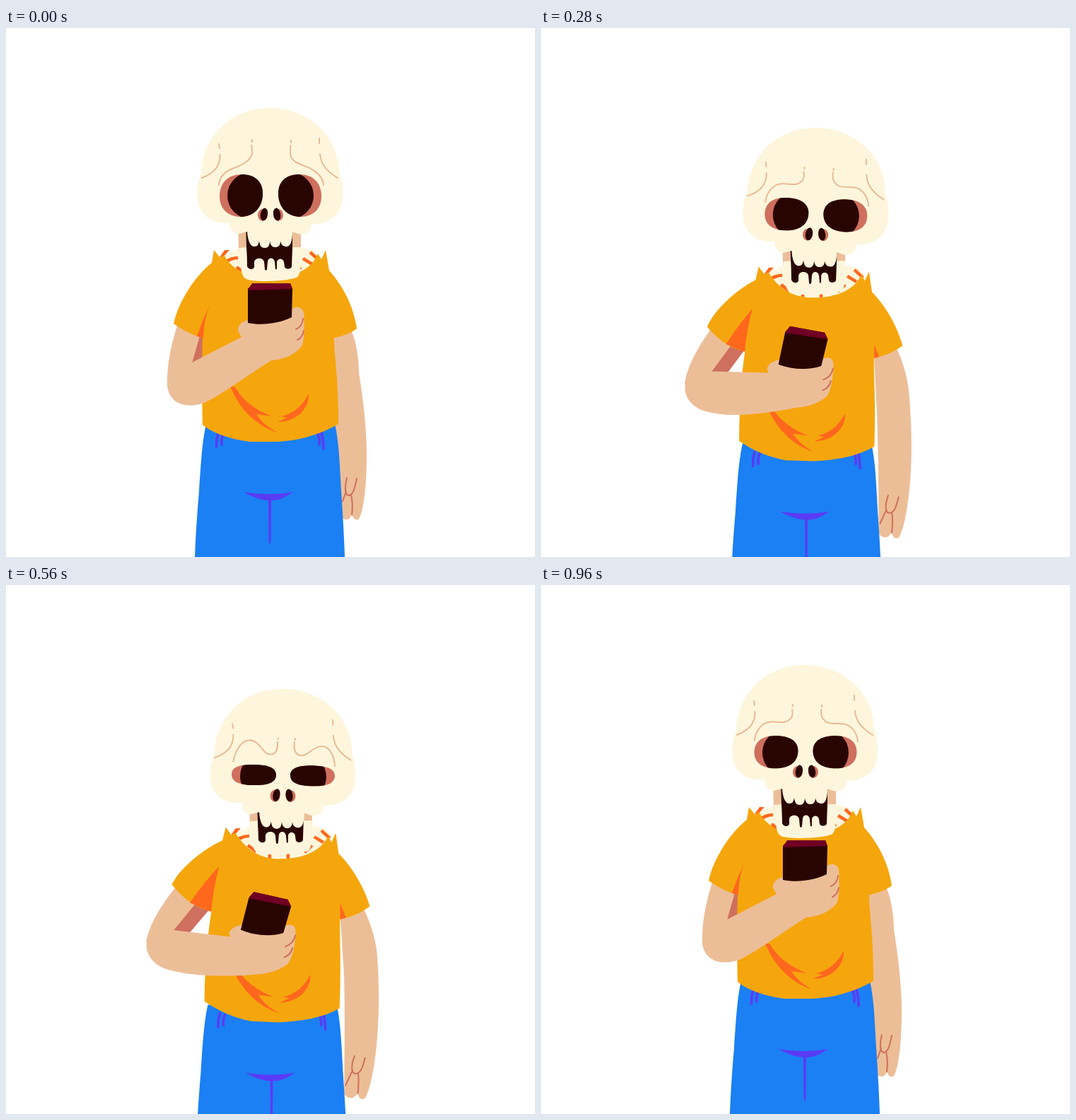
An HTML page that plays this animation: 748 px wide and 748 px high, repeating every 1000 ms.

```html
<!DOCTYPE html>
<html lang="en">
<head>
<meta charset="utf-8">
<title>Skeleton with phone</title>
<style>
html, body { margin: 0; width: 100%; height: 100%; overflow: hidden; background: #fff; }
svg { display: block; width: 100vw; height: 100vh; }
.skin { fill: #ecbe98; } .shirt { fill: #f5a60d; } .fold { fill: #ff671d; }
.bone { fill: #fdf6dc; } .dark { fill: #290502; } .shade { fill: #cf6f5e; }
.jeans { fill: #1b80f3; } .seam { fill: #5a3bf5; } .glass { fill: #700024; }
.line { fill: none; stroke-width: 2; stroke-linecap: round; stroke-linejoin: round; }
.brow { stroke: #e9ba93; } .crease { stroke: #cf6f5e; }
.pocket { stroke: #5a3bf5; stroke-width: 3.6; }
.rib { stroke: #ff671d; stroke-width: 4.5; stroke-linecap: butt; }
</style>
</head>
<body>
<svg viewBox="0 0 748 748">
  <defs><clipPath id="lid"><path id="lidShape"/></clipPath></defs>
  <path id="arm" class="skin"/>
  <path id="fingers" class="line crease"/>
  <g id="legs">
    <path class="jeans" d="M283,560 C277,585 275,625 273,655 C270,690 268,720 267,748 L264,800 H482 L479,748 C478,715 476,685 474,655 C472,620 471,585 465,560Z"/>
    <path class="line pocket" d="M300,572 Q297,582 297.500,592 M307,574 Q304,582 305,589 M441,574 Q444,582 443,589 M446,572 Q449,582 449,595"/>
    <path class="seam" d="M336,656 C358,660 385,660 406,656 C394,664 386,668 375,668 L374.500,724 Q373,736 371.500,724 L371,668 C358,667 348,663 336,656Z"/>
  </g>
  <path id="upper" class="skin"/>
  <path id="inner" class="shade"/>
  <g id="neck">
    <path class="bone" d="M306,323 L318,317 L330,311 H420 L434,314 L444,324 L434,344 L400,360 L372,362 L340,358 L314,338Z"/>
    <path class="fold" d="M302,324 L309,314 L316,314 L307,324Z"/>
    <path class="line rib" d="M310,331 Q319,325 328,325 M326,338 L338,347 M357,350 V360 M383,350 V360 M406,348 L417,338 M420,326 L433,334 M430,317 L442,328"/>
  </g>
  <path id="shirt" class="shirt"/>
  <path id="armpit" class="fold"/>
  <path id="armpitR" class="fold"/>
  <path id="folds" class="fold" d="M317,506 L324,508 C335,528 355,541 376,549 L354,546 C362,558 372,566 384,572 C355,563 330,540 317,506Z M428,517 C429,537 412,557 384,557 L398,551 L389,549 C408,545 420,533 428,517Z"/>
  <g id="jaw">
    <path class="skin" d="M328,275 H341 V316 H329Z M404,275 H417 V316 H404Z"/>
    <path class="dark" d="M339,275 H405 V345 H341Z"/>
    <path class="bone" d="M329,311 L340,310 L341,337 C343,342 350,342 351,338 L351,331 C352,324 364,324 365,331 L366,341 C366,343 369,343 369,341 L370,330 C371,324 379,324 380,331 L381,341 C382,342 383,341 383,339 L383,331 C384,325 392,325 393,331 L394,338 C396,342 404,341 404,337 L405,310 L417,310 C416,330 419,345 412,352 C400,359 345,360 338,354 C331,348 333,335 329,311Z"/>
  </g>
  <g id="head">
    <path class="bone" d="M276,205 C279,150 320,113 373,113 C425,113 470,150 471,203 C477,220 478,240 473,254 C466,270 452,277 432,277 C433,288 422,293 413,291 L405,288 C405,302 402,309 397,309 C392,309 389,307 388,301 C388,306 386,310 381,310 C376,310 374,307 373,301 C373,307 371,311 366,311 C361,311 359,308 358,301 C357,306 356,309 351,309 C346,309 342,302 341,288 L329,291 C320,290 315,283 317,275 C290,279 271,262 270.500,238 C270,225 273,215 276,205Z"/>
    <path class="line brow" d="M277,212 C295,205 303,195 302.500,179 M301,164 L302,170 M469,212 C455,204 445,194 444,178 M443,156 V163"/>
    <path id="browL" class="line brow"/>
    <path id="browR" class="line brow"/>
    <g id="eye">
      <path id="socket" class="shade"/>
      <ellipse class="dark" cx="346" cy="237" rx="33" ry="33" clip-path="url(#lid)"/>
    </g>
    <use href="#eye" transform="matrix(-1 0 0 1 748 0)"/>
    <g id="nostril">
      <ellipse class="shade" cx="363" cy="264.500" rx="7" ry="8.500"/>
      <ellipse class="dark" cx="365" cy="263.500" rx="5" ry="9" transform="rotate(10 365 263)"/>
    </g>
    <use href="#nostril" transform="matrix(-1 0 0 1 748 0)"/>
  </g>
  <path id="forearm" class="skin"/>
  <path id="phone" class="dark"/>
  <path id="phoneTop" class="glass"/>
  <path id="knuckles" class="line crease"/>
</svg>
<script>
const $ = id => document.getElementById(id);

// Each shape: raised pose, lowered pose
const body = {
  arm: [
    "M478,415 L488,427 C496,445 499,470 499,488 C506,530 510,570 510,605 C510,650 505,685 499,694 C494,698 490,692 489,688 C486,697 480,696 474,692 L468,600 C462,570 462,520 461,500 L462,425Z",
    "M498,450 L510,466 C520,485 528,510 530,530 C532,570 531,600 529,630 C525,690 515,728 508,733 C501,735 500,729 499,724 C493,735 483,733 479,725 L481,620 C482,590 482,560 480,541 L474,465Z"],
  fingers: [
    "M482,636 C478,652 480,661 485,661 C492,659 493,650 496,637 M488,660 Q491,674 489,688 M481,655 L476,669",
    "M495,672 C489,686 490,697 496,697 C505,696 506,688 510,675 M500,697 Q501,710 499,725 M492,692 L481,715"],
  shirt: [
    "M294,314 L303,325 L308,321 L314,330 C326,344 345,353 372,353 C400,353 422,346 435,330 L441,319 L446,327 L452,314 L457,343 C477,365 492,395 496,425 C487,432 475,436 464,438 C464,465 470,490 470,560 C440,577 410,584 383,585 L345,585 C318,582 290,572 278,561 C277,520 277,470 278,438 C262,434 250,427 237,418 C244,385 270,348 291,332Z",
    "M314,348 L322,359 L327,356 L333,364 C348,384 365,394 392,394 C418,394 440,386 452,372 L459,362 L463,371 L469,358 L473,387 C492,405 510,435 518,460 C508,468 490,477 474,479 C473,500 475,540 472,606 C450,619 420,623 385,625 L347,623 C325,619 300,607 281,594 C282,550 285,510 293,466 C265,460 250,445 234,425 C245,403 285,376 309,367Z"],
  armpit: [
    "M288,392 Q279,410 270,436 L279,438 Q280,410 288,392Z",
    "M304,399 Q282,420 258,452 L292,467 Q296,432 304,399Z"],
  armpitR: ["M465,438 L465,438 L465,438Z", "M474,452 L484,477 L474,480Z"]
};
const arm = {
  upper: [
    "M244,414 C236,440 229,465 228,495 L263,485 L270,465 L281,430Z",
    "M242,426 C220,450 196,482 192,508 L232,505 L245,485 L278,455Z"],
  inner: [
    "M277,425 L263,474 L282,465 L284,430Z",
    "M268,452 L231,492 L254,498 L290,460Z"],
  forearm: [
    "M230,482 C227,498 226,512 234,522 C243,534 258,536 278,531 C300,522 340,492 375,470 C395,469 410,460 418,450 C422,443 422,420 421,402 C418,393 408,393 404,398 L342,413 C333,415 328,420 328,428 L333,437 L263,473Z",
    "M197,495 C191,508 190,520 202,533 C212,545 232,549 256,554 C285,560 320,566 346,567 C365,566 380,561 391,553 C398,545 404,520 403,506 C403,499 398,497 390,499 L328,494 C318,496 311,500 309,506 L310,510 L232,491Z"],
  phone: [
    "M349,361 L402,361 L405,369 L404,409 C385,418 362,421 342,417 L342,369Z",
    "M347,449 L394,462 L399,472 L386,509 C368,514 345,511 326,502 L340,457Z"],
  phoneTop: [
    "M348,361 L402,361 L405,369 L342,371Z",
    "M347,449 L394,462 L398,472 L340,458Z"],
  knuckles: [
    "M420,411 Q419,422 410,426 M421,428 Q419,438 412,441",
    "M403,513 Q400,525 388,529 M398,531 Q395,541 386,544"]
};
const face = {
  browL: [
    "M301,222 C302,210 310,203 320,199 C332,194 346,189 348,177 C348,174 348,171 347,166 M347.500,158 L348,161",
    "M303,217 C307,195 318,184 330,187 C342,191 345,206 355,206 C365,206 366,195 365,188 M366,183 L366,184"],
  browR: [
    "M449,222 C448,211 439,203 429,198 C418,193 403,190 402,178 C402,174 402,171 402.5,166 M403,159 L403,162",
    "M447,221 C445,203 436,190 424,194 C412,198 408,207 399,207 C390,206 388,198 389,188 M390,183 L390,185"],
  socket: [
    "M302,238 C302,219 314,207 333,207 C352,207 363,217 363,234 C363,254 350,267 332,267 C314,267 302,256 302,238Z",
    "M301,235 C301,226 309,222 326,221 C348,220 364,223 364,235 C364,246 352,250 330,250 C311,250 301,245 301,235Z"]
};
face.lidShape = face.socket;

// Time in ms, value
const travel = [[0, 0], [440, 1.085], [960, 0], [1000, 0]];
const tilt = [[0, 0], [280, 1.5], [480, 1.5], [680, .2], [800, -.5], [960, 0], [1000, 0]];
const squint = [[0, 0], [240, 0], [280, .45], [320, .9], [360, 1], [880, 1], [920, .9], [960, .45], [1000, 0]];

function at(keys, t) {
  const i = keys.findIndex(key => key[0] > t);
  const [t0, v0] = keys[i - 1], [t1, v1] = keys[i];
  return v0 + (v1 - v0) * (t - t0) / (t1 - t0);
}

// Blend two paths; bow pushes the hand side outwards on its arc
function mix([a, b], k, bow = 0) {
  const pair = /([\d.]+),([\d.]+)/g;
  const ends = [...b.matchAll(pair)];
  let i = 0;
  return a.replace(pair, (_, x, y) => {
    const end = ends[i++];
    const px = +x + (end[1] - x) * k;
    const py = +y + (end[2] - y) * k;
    const weight = Math.min(1, Math.max(0, (px - 250) / 60));
    return (px + bow * weight).toFixed(2) + "," + py.toFixed(2);
  });
}

function pose(shapes, k, bow) {
  for (const id in shapes) $(id).setAttribute("d", mix(shapes[id], k, bow));
}

function move(id, x, y, turn = 0) {
  $(id).setAttribute("transform", `translate(${x} ${y}) rotate(${turn} 374 236)`);
}

function draw(now) {
  const t = Math.floor(now % 1000 / 40) * 40;
  const k = at(travel, t);
  // The arm eases out a little on the way back up
  const reach = t > 480 ? k - .25 * k * (1 - k) ** 2 : k;
  pose(body, k);
  pose(arm, reach, 22 * reach * (1 - reach));
  pose(face, at(squint, t));
  move("legs", 3 * k, 40 * k);
  move("folds", 3 * k, 40 * k);
  move("neck", 19 * k, 36 * k);
  move("jaw", 19 * k, 28 * k);
  move("head", 21.5 * k, 40.5 * k, at(tilt, t));
}

const start = performance.now();
function tick() {
  draw(performance.now() - start);
  requestAnimationFrame(tick);
}
tick();
</script>
</body>
</html>
```
